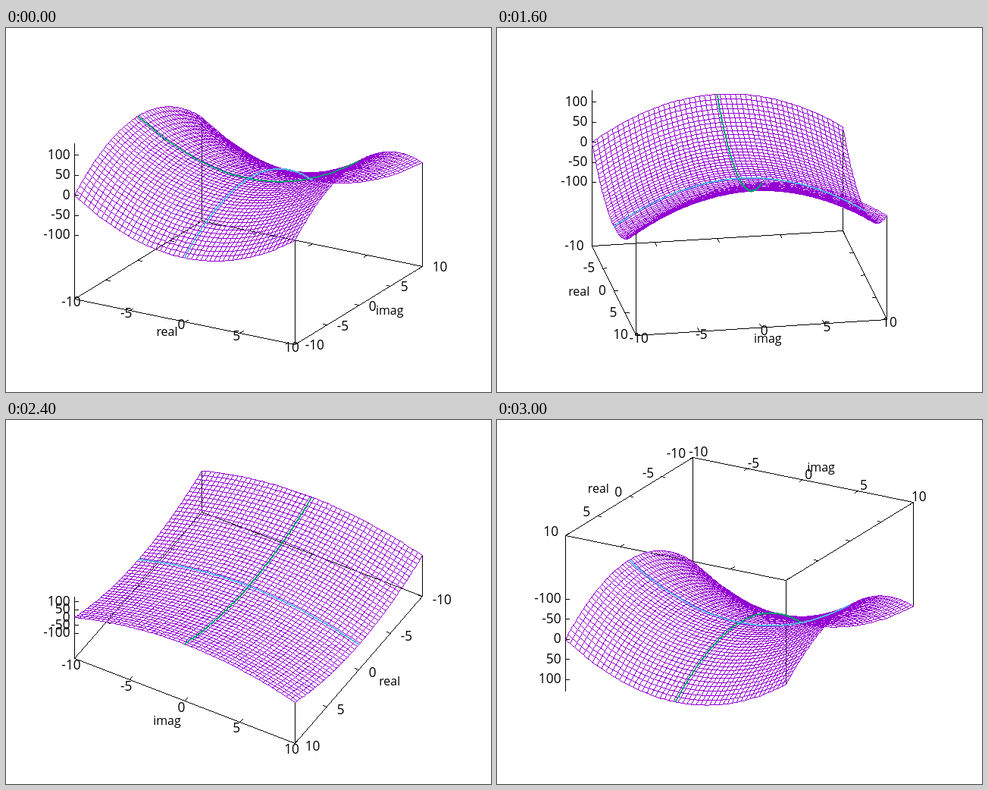
Write an HTML page with a canvas that moves like this. It is 640x480 px and loops after 4200 ms.

```html
<!DOCTYPE html>
<html lang="en">
<head>
<meta charset="utf-8">
<title>Saddle surface</title>
<style>
  html, body { margin: 0; width: 100%; height: 100%; overflow: hidden; background: #fff; }
  canvas { display: block; }
</style>
</head>
<body>
<canvas id="stage" width="640" height="480"></canvas>
<script>
const ctx = document.getElementById('stage').getContext('2d');
const LOOP = 4200, STEP = 100;
const PURPLE = '#9400d3', GREEN = '#009e73', BLUE = '#56b4e9', BLACK = '#000';
const GRID_LINES = 50, SAMPLES = 100, RANGE = 10, Z_MAX = 130;
const SCALE_X = 168, SCALE_Y = 118.9, CENTER_X = 319.5, CENTER_Y = 232.72;
const NUMBER_FONT = '17.3px "Open Sans", sans-serif';
const TITLE_FONT = '16px "Open Sans", sans-serif';
const LABEL_GAP = { left: 3, center: 1.4, right: 0.8 };

const clamp = (v, lo, hi) => Math.min(hi, Math.max(lo, v));
const rad = degrees => degrees * Math.PI / 180;
const height = z => z / (1.5 * Z_MAX) + 1 / 3;
const saddle = (re, im) => [re, im, height(RANGE * RANGE * (re * re - im * im))];

// Maps a point of the cube [-1, 1]^3 to stage pixels.
function makeProjection(turn, tilt) {
  const ca = Math.cos(rad(turn)), sa = Math.sin(rad(turn));
  const cb = Math.cos(rad(tilt)), sb = Math.sin(rad(tilt));
  return ([x, y, z]) => [
    CENTER_X + SCALE_X * (x * ca + y * sa),
    CENTER_Y - SCALE_Y * ((y * ca - x * sa) * cb + z * sb)
  ];
}

// Draws a line without antialiasing, always along its longer axis in rising order.
function line(from, to, width = 1) {
  let a = from.map(Math.round), b = to.map(Math.round);
  const major = Math.abs(b[0] - a[0]) >= Math.abs(b[1] - a[1]) ? 0 : 1;
  const minor = 1 - major;
  if (a[major] > b[major]) [a, b] = [b, a];
  const steps = b[major] - a[major], rise = b[minor] - a[minor];
  const slope = steps ? Math.abs(rise) / steps : 0;
  const run = width === 1 ? 1 : Math.round(width * Math.hypot(1, slope));
  const shift = run >> 1;
  for (let i = 0; i <= steps; i++) {
    const along = a[major] + i;
    const across = a[minor] + Math.sign(rise) * Math.floor(slope * i + 0.5) - shift;
    if (major === 0) ctx.fillRect(along, across, 1, run);
    else ctx.fillRect(across, along, run, 1);
  }
}

function curve(project, pointAt, color, width) {
  ctx.fillStyle = color;
  let last = project(pointAt(-1));
  for (let i = 1; i < SAMPLES; i++) {
    const next = project(pointAt(2 * i / (SAMPLES - 1) - 1));
    line(last, next, width);
    last = next;
  }
}

function text(label, x, y, align, font = NUMBER_FONT) {
  ctx.font = font;
  ctx.textAlign = align;
  ctx.fillText(label, x + 0.5, y + 6.5);
}

// Ticks on both parallel base edges, numbers and title on the outer one.
function baseAxis(project, pointAt, side, title) {
  const from = project(pointAt(0, -side)), to = project(pointAt(0, side));
  const out = [to[0] - from[0], to[1] - from[1]];
  const length = Math.hypot(...out);
  const tick = out.map(v => 5 * v / length);
  const align = Math.abs(out[0]) < SCALE_X * Math.SQRT2 ? 'center' : out[0] > 0 ? 'left' : 'right';

  for (let value = -RANGE; value <= RANGE; value += 5) {
    const near = project(pointAt(value / RANGE, side));
    const far = project(pointAt(value / RANGE, -side));
    line(near, [near[0] - tick[0], near[1] - tick[1]]);
    line(far, [far[0] + tick[0], far[1] + tick[1]]);
    text(value, near[0] + out[0] * 0.035 + LABEL_GAP[align], near[1] + out[1] * 0.051 - 2, align);
  }
  text(title, to[0] + out[0] * 0.14, to[1] + out[1] * 0.141 - 2, 'center', TITLE_FONT);
}

function frameBox(project, turn, tilt) {
  ctx.fillStyle = BLACK;
  const corners = [[-1, -1], [1, -1], [1, 1], [-1, 1]];
  const base = corners.map(([x, y]) => project([x, y, -1]));
  const leftmost = base.reduce((best, p, i) => p[0] < base[best][0] ? i : best, 0);
  base.forEach((p, i) => {
    line(p, base[(i + 1) % 4]);
    line(p, project([...corners[i], i === leftmost ? 1 : height(0)]));
  });

  const up = Math.sign(tilt);
  baseAxis(project, (v, side) => [v, side, -1], turn < 90 ? -up : up, 'real');
  baseAxis(project, (v, side) => [side, v, -1], up, 'imag');

  for (let value = -100; value <= 100; value += 50) {
    const [x, y] = project([...corners[leftmost], height(value)]);
    line([x, y], [x + 5, y]);
    text(value, x - 6, y - 1, 'right');
  }
}

function draw(turn, tilt) {
  const project = makeProjection(turn, tilt);
  ctx.fillStyle = '#fff';
  ctx.fillRect(0, 0, 640, 480);
  frameBox(project, turn, tilt);
  for (let i = 0; i < GRID_LINES; i++) {
    const fixed = 2 * i / (GRID_LINES - 1) - 1;
    curve(project, v => saddle(v, fixed), PURPLE, 1);
    curve(project, v => saddle(fixed, v), PURPLE, 1);
  }
  curve(project, v => saddle(v, 0), GREEN, 2);
  curve(project, v => saddle(0, v), BLUE, 2);
}

const start = performance.now();
let shown = '';

function tick() {
  const t = (performance.now() - start) % LOOP;
  // Nine turns of 10 degrees, then nine whole-degree tilts from 60 to -60.
  const turn = 30 + 10 * clamp(Math.floor((t - 1100) / STEP), 0, 9);
  const tilt = 60 - Math.floor(clamp(Math.floor((t - 2100) / STEP), 0, 9) * 120 / 9);
  const pose = turn + ',' + tilt;
  if (pose !== shown) {
    draw(turn, tilt);
    shown = pose;
  }
  requestAnimationFrame(tick);
}
tick();
</script>
</body>
</html>
```
